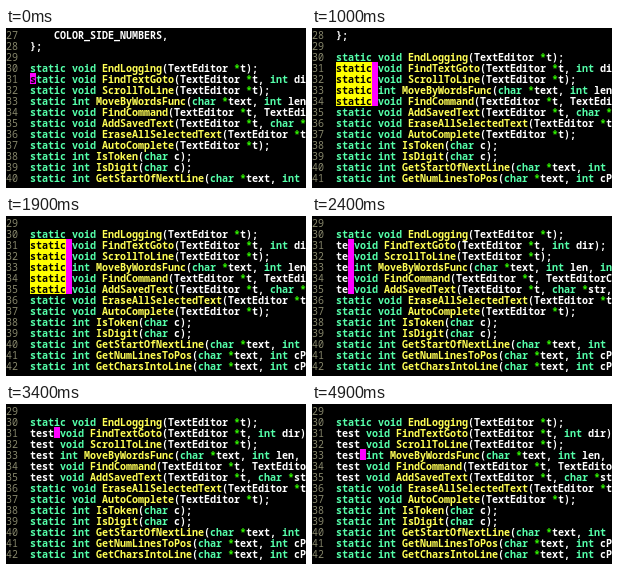
An HTML page with a canvas for the animation above (5 s loop, 300x160 px).

```html
<!DOCTYPE html>
<html lang="en">
<head>
<meta charset="utf-8">
<style>
html, body { margin: 0; width: 100%; height: 100%; overflow: hidden; background: #000; }
canvas { display: block; }
</style>
</head>
<body>
<canvas id="view" width="300" height="160"></canvas>
<script>
const ctx = document.getElementById('view').getContext('2d');
const LOOP = 5000, CELL = 6, ROW = 11, TOP = 1, LEFT = 24;
const AQUA = '#55ffaa', YELLOW = '#ffff55', WHITE = '#ffffff', GREEN = '#33ff00', GRAY = '#85856a';
const MARK = '#ffff00', CURSOR = '#ff00ff';
const FONT = '10px "Noto Sans Mono", "DejaVu Sans Mono", monospace';
const FIRST = 27;
const source = `    COLOR_SIDE_NUMBERS,
};

static void EndLogging(TextEditor *t);
static void FindTextGoto(TextEditor *t, int dir);
static void ScrollToLine(TextEditor *t);
static int MoveByWordsFunc(char *text, int len, int dir);
static void FindCommand(TextEditor *t, TextEditorCommand *c);
static void AddSavedText(TextEditor *t, char *str, int len);
static void EraseAllSelectedText(TextEditor *t);
static void AutoComplete(TextEditor *t);
static int IsToken(char c);
static int IsDigit(char c);
static int GetStartOfNextLine(char *text, int cPos);
static int GetNumLinesToPos(char *text, int cPos);
static int GetCharsIntoLine(char *text, int cPos);`.split('\n');

// Each step changes part of the editor state from its start time on.
const steps = [
  [0, { top: 27, from: 31, to: 31, col: 0, marked: false, word: 'static', popup: false }],
  [300, { col: 6, marked: true }],
  [500, { to: 32 }],
  [700, { to: 33 }],
  [900, { to: 34, top: 28 }],
  [1400, { to: 35, top: 29 }],
  [2200, { word: '', col: 0, marked: false }],
  [2300, { word: 't', col: 1 }],
  [2400, { word: 'te', col: 2 }],
  [2500, { word: 'tes', col: 3 }],
  [2600, { word: 'test', col: 4, popup: true }],
  [2900, { popup: false }],
  [3200, { to: 31 }],
  [4000, { from: 32, to: 32 }],
  [4400, { from: 33, to: 33 }]
];

const colX = col => LEFT + col * CELL;
const rowY = row => TOP + row * ROW;

function box(col, row, cols, color) {
  ctx.fillStyle = color;
  ctx.fillRect(colX(col), rowY(row), cols * CELL, ROW);
}

function put(text, col, row, color, weight = 600) {
  ctx.font = `${weight} ${FONT}`;
  ctx.fillStyle = color;
  ctx.fillText(text, colX(col), rowY(row) + 10);
}

function tint(token, next) {
  if (/^(static|void|int|char)$/.test(token)) return AQUA;
  if (token === '*') return GREEN;
  return next === '(' ? YELLOW : WHITE;
}

function putCode(line, row) {
  for (const { 0: token, index } of line.matchAll(/\w+|[^\w\s]/g)) {
    put(token, index, row, tint(token, line[index + token.length]));
  }
}

function draw(s) {
  ctx.fillStyle = '#000';
  ctx.fillRect(0, 0, 300, 160);
  for (let row = 0; row < 14; row++) {
    const num = s.top + row;
    let line = source[num - FIRST];
    if (num >= 31 && num <= 35) line = line.replace('static', s.word);
    put(num, -4, row, GRAY, 400);
    putCode(line, row);
    if (num < s.from || num > s.to) continue;
    if (s.marked) {
      box(0, row, s.col, MARK);
      put(line.slice(0, s.col), 0, row, '#000');
    }
    box(s.col, row, 1, CURSOR);
    put(line[s.col], s.col, row, '#000');
  }
  if (s.popup) {
    const row = s.to + 1 - s.top;
    box(s.col, row, 35, MARK);
    put('test', s.col, row, '#000');
  }
}

function frame(now) {
  const t = now % LOOP;
  draw(Object.assign({}, ...steps.filter(([at]) => at <= t).map(([, change]) => change)));
  requestAnimationFrame(frame);
}
frame(performance.now());
</script>
</body>
</html>
```
